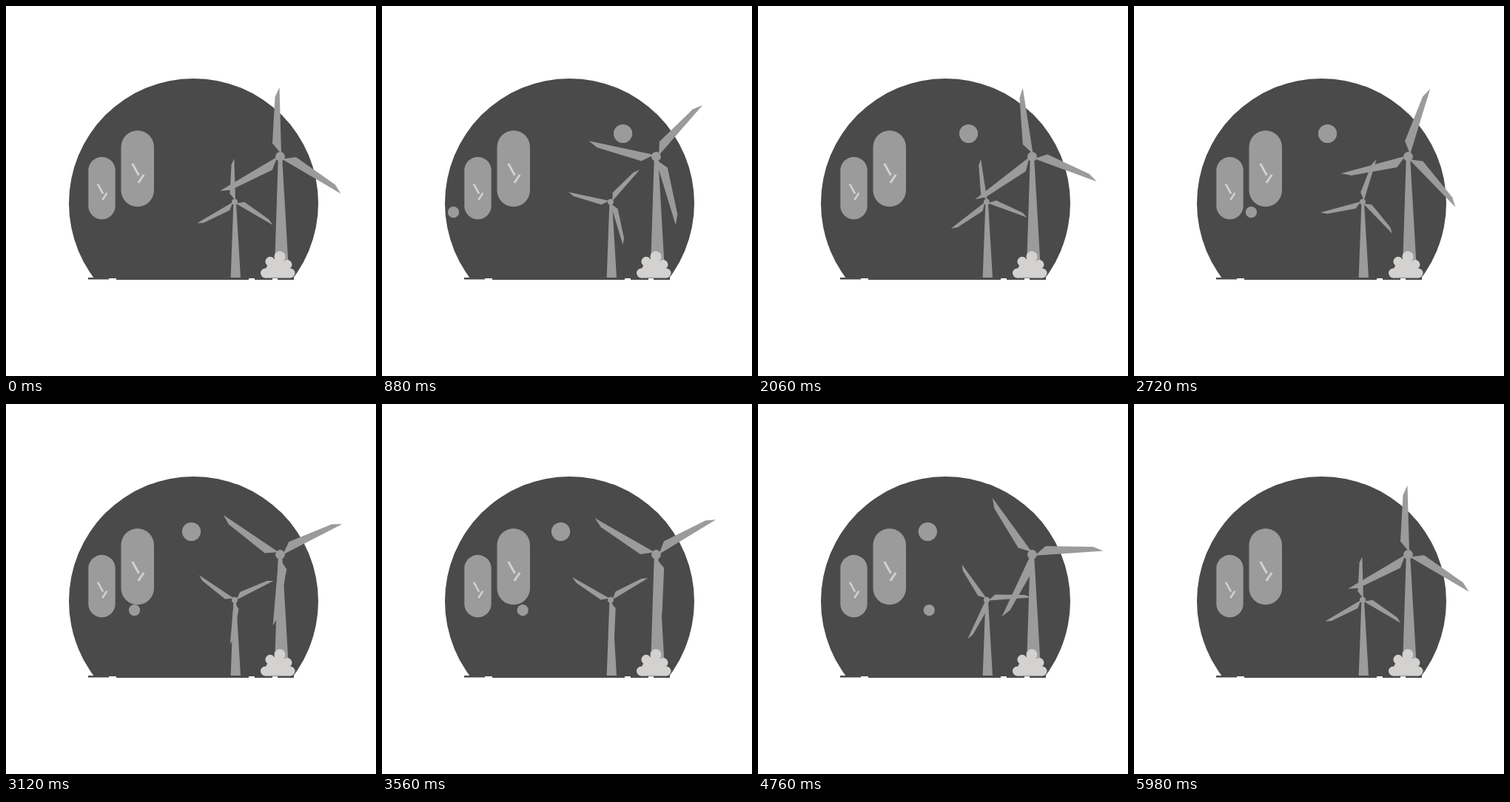
An HTML page for the animation above (6 s loop, 500x500 px).

```html
<!DOCTYPE html>
<html lang="en">
<head>
<meta charset="utf-8">
<title>Wind turbines</title>
<style>
  html, body { margin: 0; width: 100%; height: 100%; overflow: hidden; background: #fff; }
  svg { display: block; width: 100%; height: 100%; }
</style>
</head>
<body>
<svg viewBox="0 0 500 500">
  <defs>
    <clipPath id="horizon"><rect width="500" height="368"/></clipPath>
    <path id="blade" d="M-1-93.5L-7-80.5L-10.5-18L.3-5H1.5Z"/>
    <g id="rotor">
      <use href="#blade"/>
      <use href="#blade" transform="rotate(122) scale(1.03)"/>
      <use href="#blade" transform="rotate(241)"/>
    </g>
  </defs>

  <g fill="#4a4a4a">
    <circle cx="253.5" cy="266.5" r="168.5" clip-path="url(#horizon)"/>
    <path d="M111 367h28v2.5h-28zM149 367h179v3H149zM336 367h24v3h-24zM367 367h22v3h-22z"/>
  </g>

  <g fill="#9b9b9b">
    <rect x="111.3" y="204" width="36.4" height="84.3" rx="18.2"/>
    <rect x="155.5" y="168.3" width="44.5" height="103" rx="22.2"/>
    <circle id="bigBall" cy="172.5" r="12.6"/>
    <circle id="smallBall" cy="278.7" r="7.6"/>
    <path d="M307.4 266h3.6L317 367h-13.3zM367.8 206h5.4L382.6 367h-20z"/>
    <circle cx="309" cy="264.7" r="4"/>
    <circle cx="370.5" cy="203.5" r="6.4"/>
    <use id="smallRotor" href="#rotor"/>
    <use id="bigRotor" href="#rotor"/>
  </g>

  <g fill="none" stroke="#d3d2d0">
    <path stroke-width="3" d="M170.7 213l8.8 15.7M186.3 228l-7.6 11"/>
    <path stroke-width="2.5" d="M124 240.7l7 13M136.3 252.7l-6 9.3"/>
  </g>

  <g fill="#d3d2d0">
    <circle cx="370" cy="338.7" r="7.5"/>
    <circle cx="357" cy="345.3" r="6.5"/>
    <circle cx="380" cy="349.5" r="6.5"/>
    <circle cx="350.5" cy="361" r="6.5"/>
    <circle cx="384" cy="361" r="6.5"/>
    <circle cx="367" cy="354" r="12.5"/>
    <path d="M350 367.5V357l6-12 14-6 10 10 4 8v10.5z"/>
  </g>
</svg>
<script>
const LOOP = 6000;
const el = id => document.getElementById(id);
const clamp = v => Math.max(0, Math.min(1, v));

// Cubic bezier easing through (x1, 0) and (x2, 1).
function ease(x, x1, x2) {
  let lo = 0, hi = 1;
  for (let i = 0; i < 30; i++) {
    const u = (lo + hi) / 2, v = 1 - u;
    if (3 * v * v * u * x1 + 3 * v * u * u * x2 + u ** 3 < x) lo = u;
    else hi = u;
  }
  return lo * lo * (3 - 2 * lo);
}

function placeRotor(id, x, y, scale, angle) {
  el(id).setAttribute('transform', `translate(${x} ${y}) scale(${scale}) rotate(${angle})`);
}

function placeBall(id, x, opacity) {
  el(id).setAttribute('cx', x);
  el(id).setAttribute('opacity', opacity);
}

function render(t) {
  const angle = 1440 * ease(t / LOOP, 0.57, 0.14);
  placeRotor('bigRotor', 370.5, 203.5, 1, angle);
  placeRotor('smallRotor', 309, 264.7, 0.626, angle);

  const opacity = Math.min(clamp((t - 480) / 120), clamp((5500 - t) / 300));
  const s = (t - 3000) / 1000;
  placeBall('bigBall', 290.7 - 66 * Math.tanh((t - 1900) / 1730), opacity);
  placeBall('smallBall', 169 + 38 * s - 0.85 * s ** 3, opacity);
}

const start = performance.now();
function tick() {
  render((performance.now() - start) % LOOP);
  requestAnimationFrame(tick);
}
render(0);
requestAnimationFrame(tick);
</script>
</body>
</html>
```
